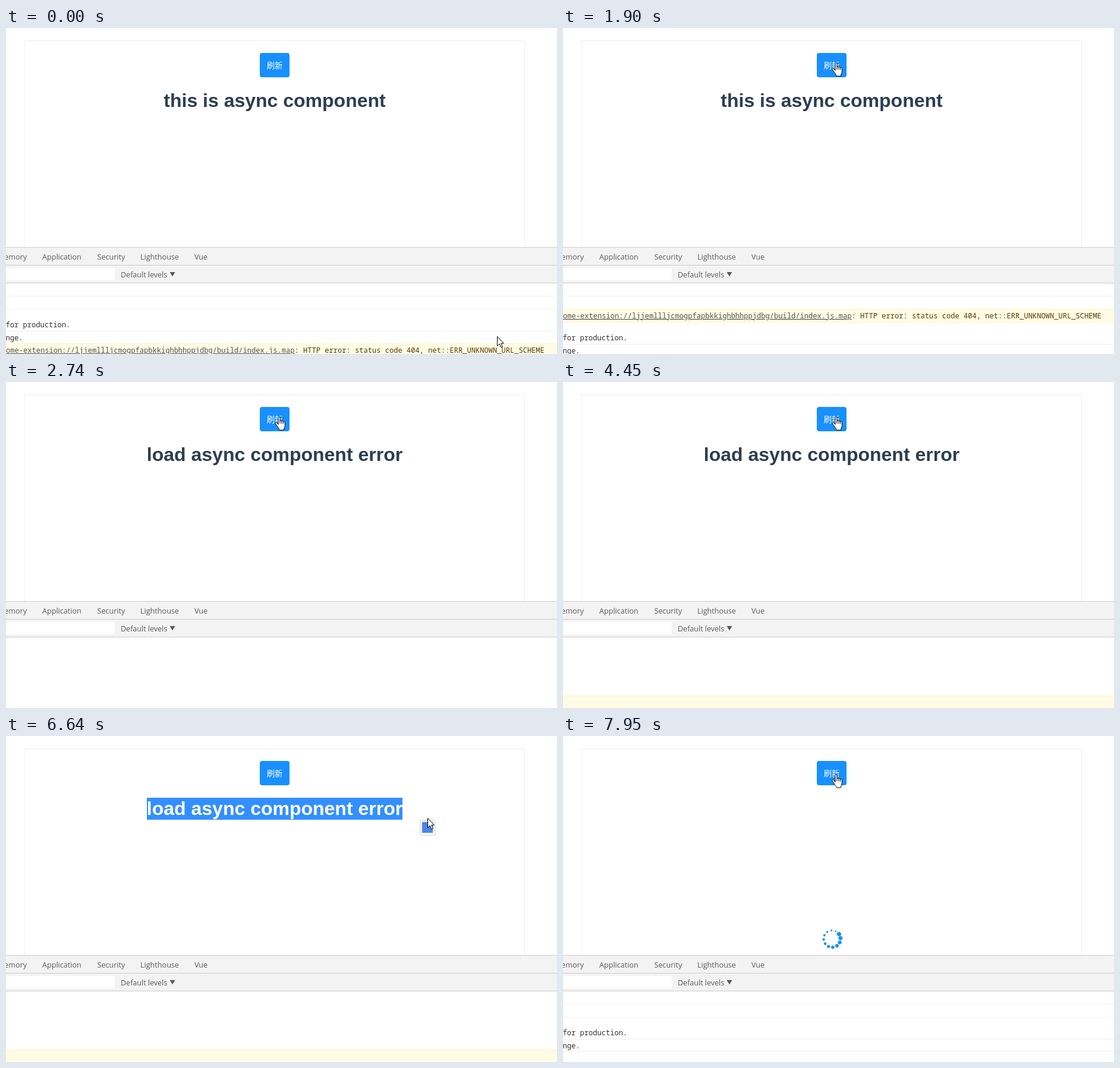
An HTML page that plays this animation: 927 by 549 pixels, repeating every 8 s.

```html
<!DOCTYPE html>
<html lang="en">
<head>
<meta charset="utf-8">
<title>Async component</title>
<style>
  html, body { margin: 0; width: 100%; height: 100%; overflow: hidden; background: #fff; }
  svg { display: block; }
  .ui { font: 12.6px "Open Sans", "Noto Sans", sans-serif; fill: #5a5a5a; }
  .mono { font: 12.08px "Noto Sans Mono", "DejaVu Sans Mono", monospace; fill: #303030; white-space: pre; }
  .title { font: bold 32px "Liberation Sans", Arial, sans-serif; fill: #2c3e50; text-anchor: middle; }
  .line { fill: #f0f0f0; }
  .rule { fill: #cccccc; }
  .warn { fill: #5c3c00; }
  .link { fill: #545454; text-decoration: underline; }
  .cursor { fill: #fff; stroke: #000; stroke-linejoin: round; }
</style>
</head>
<body>
<svg width="927" height="549" viewBox="0 0 927 549">
  <defs>
    <clipPath id="selected"><rect id="selRect" x="237" y="104" width="0" height="37"/></clipPath>
    <g id="lines">
      <rect class="line" y="451" width="927" height="1"/>
    </g>
    <g id="logs" class="mono">
      <text x="-.5" y="504">for production.</text>
      <rect class="line" y="510" width="927" height="1"/>
      <text x="-.5" y="526">nge.</text>
    </g>
    <g id="warning">
      <rect y="473" width="927" height="23" fill="#fff5c2"/>
      <rect y="474" width="927" height="21" fill="#fffbe5"/>
      <text class="mono" x="0" y="489"><tspan class="link">ome-extension://ljjemllljcmogpfapbkkighbhhppjdbg/build/index.js.map</tspan><tspan class="warn">: HTTP error: status code 404, net::ERR_UNKNOWN_URL_SCHEME</tspan></text>
    </g>
  </defs>

  <rect width="927" height="549" fill="#fff"/>
  <rect x="31.5" y="21.5" width="841" height="400" fill="none" stroke="#eeeeee"/>
  <rect x="427" y="42" width="50" height="41" rx="4" fill="#1890ff"/>
  <text x="452" y="68" text-anchor="middle" fill="#fff" style="font: 13.33px 'Noto Sans CJK SC', 'Noto Sans CJK', sans-serif">刷新</text>

  <text id="ok" class="title" x="452" y="133">this is async component</text>
  <text id="fail" class="title" x="452" y="133">load async component error</text>
  <g id="selection" clip-path="url(#selected)">
    <rect x="237" y="104" width="430" height="37" fill="#338fff"/>
    <text class="title" x="452" y="133" style="fill:#fff">load async component error</text>
  </g>
  <g id="spinner" fill="#1890ff"></g>

  <!-- developer tools -->
  <rect y="369" width="927" height="180" fill="#fff"/>
  <rect y="369" width="927" height="61" fill="#f3f3f3"/>
  <rect class="rule" y="369" width="927" height="1"/>
  <rect class="rule" y="399" width="927" height="1"/>
  <rect class="rule" y="429" width="927" height="1"/>
  <rect y="404" width="183" height="21" fill="#fff"/>
  <g class="ui">
    <text x="35" y="390" text-anchor="end">Memory</text>
    <text x="61" y="390">Application</text>
    <text x="153.5" y="390">Security</text>
    <text x="226" y="390">Lighthouse</text>
    <text x="317" y="390">Vue</text>
    <text x="193" y="420" font-size="12.5">Default levels</text>
    <path d="M275.5 411h9l-4.5 7.5z"/>
  </g>

  <g id="logsThenWarning">
    <use href="#lines"/><use href="#lines" y="22"/><use href="#logs"/>
    <use href="#warning" y="58"/>
  </g>
  <g id="cleared"><use href="#lines"/><use href="#lines" y="21"/></g>
  <g id="logsOnly">
    <use href="#lines"/><use href="#lines" y="22"/><use href="#logs"/><use href="#lines" y="79"/>
  </g>
  <g id="warningThenLogs">
    <use href="#lines"/><use href="#warning"/><use href="#logs" y="22"/>
  </g>
  <g id="warningBar">
    <rect y="528" width="927" height="21" fill="#fff5c2"/>
    <rect y="529" width="927" height="20" fill="#fffbe5"/>
  </g>

  <g id="popup">
    <rect x="696.5" y="141.5" width="26" height="26" rx="4" fill="#f4f5f7" stroke="#d8d8d8"/>
    <rect x="700" y="145" width="18" height="18" fill="#4a86e8"/>
  </g>

  <g id="pointer">
    <circle id="press" r="12" fill="#ffff00" fill-opacity=".47"/>
    <path id="arrow" class="cursor" d="M.5 .5V16.5L4.2 13L7 19L9.4 18L6.8 12H11.5Z"/>
    <g id="hand" class="cursor" transform="translate(-6 0)">
      <path d="M6 13.5V2.2a1.5 1.5 0 0 1 3 0V8.2a1.5 1.4 0 0 1 3 .2a1.4 1.4 0 0 1 2.7 .6a1.4 1.4 0 0 1 2.6 .6V15.5c0 3-2 4-2 7.5H8.3c0-2-3-4.5-5-8.2c-1.4-2.2-2.6-3.2-2.3-4.3c.4-1.1 2-.8 3 .5z"/>
      <path d="M9 8.2v4M12 8.4v4M14.7 9v3.5" fill="none"/>
    </g>
    <path id="beam" d="M-3 -8.5h2.5l.5 .5l.5 -.5H3M0 -8V8M-3 8.5h2.5l.5 -.5l.5 .5H3" fill="none" stroke="#000"/>
  </g>
</svg>
<script>
const LOOP = 8000;
const $ = id => document.getElementById(id);
const within = (t, spans) => spans.some(([from, to]) => t >= from && t < to);

// Screen updates come in evenly spaced steps: first, last, count.
const bursts = [[70, 820, 11], [900, 1670, 11], [1750, 1900, 3], [2450, 2740, 5],
  [5860, 6640, 11], [6710, 7480, 11], [7570, 7950, 6]];

// Pointer stops: time, x, y.
const stops = [[0, 826, 519], [60, 826, 519], [520, 468, 34], [670, 462, 57], [980, 462, 57],
  [1290, 458, 58], [5790, 458, 58], [6172, 240, 122], [6560, 702, 151], [6640, 709, 138],
  [6720, 709, 138], [7480, 458, 64], [LOOP, 458, 64]];

const spans = {
  ok: [[0, 820], [1900, 2520]],
  fail: [[2740, 7720]],
  spinner: [[900, 1900], [2595, 2740], [7798, LOOP]],
  logsThenWarning: [[0, 820]],
  cleared: [[820, 1050], [7720, 7870]],
  logsOnly: [[1050, 1360], [7870, LOOP]],
  warningThenLogs: [[1360, 2520]],
  warningBar: [[4450, 5230], [5550, 7720]],
  selection: [[6172, 7018]],
  popup: [[6640, 7018]],
  press: [[670, 745], [2280, 2450], [3750, 3840], [4930, 5000], [6172, 6560], [7570, 7646]]
};

const DOTS = 12;
for (let i = 0; i < DOTS; i++) {
  const dot = document.createElementNS("http://www.w3.org/2000/svg", "circle");
  const angle = i / DOTS * 2 * Math.PI - Math.PI / 2;
  dot.setAttribute("cx", 14.2 * Math.cos(angle));
  dot.setAttribute("cy", 14.2 * Math.sin(angle));
  dot.setAttribute("r", 3.6 - 2.3 * i / (DOTS - 1));
  $("spinner").append(dot);
}

function snap(t) {
  for (const [first, last, count] of bursts) {
    if (t < first || t > last) continue;
    const step = (last - first) / (count - 1);
    return first + Math.floor((t - first) / step + 1e-6) * step + .5;
  }
  return t;
}

function pointerAt(t) {
  const i = Math.max(1, stops.findIndex(stop => stop[0] > t));
  const [t0, x0, y0] = stops[i - 1], [t1, x1, y1] = stops[i];
  const p = (t - t0) / (t1 - t0), ease = p * p * (3 - 2 * p);
  return [x0 + (x1 - x0) * ease, y0 + (y1 - y0) * ease].map(Math.round);
}

const show = (id, on) => { $(id).style.display = on ? "" : "none"; };

function draw(now) {
  const t = snap(now % LOOP);
  for (const id in spans) show(id, within(t, spans[id]));

  const [x, y] = pointerAt(t);
  const onButton = x >= 427 && x < 477 && y >= 42 && y < 83;
  const onTitle = within(t, spans.fail) && x >= 237 && x < 667 && y >= 104 && y < 141;
  $("pointer").setAttribute("transform", `translate(${x} ${y})`);
  show("hand", onButton);
  show("beam", onTitle);
  show("arrow", !onButton && !onTitle);

  const reach = t < 6560 ? Math.min(667, Math.max(237, x)) : 667;
  $("selRect").setAttribute("width", reach - 237);

  const start = (spans.spinner.find(([from, to]) => t >= from && t < to) || [0])[0];
  $("spinner").setAttribute("transform", `translate(452.7 341.6) rotate(${(t - start) * .36})`);
  requestAnimationFrame(() => draw(performance.now() - origin));
}

const origin = performance.now();
draw(0);
</script>
</body>
</html>
```
